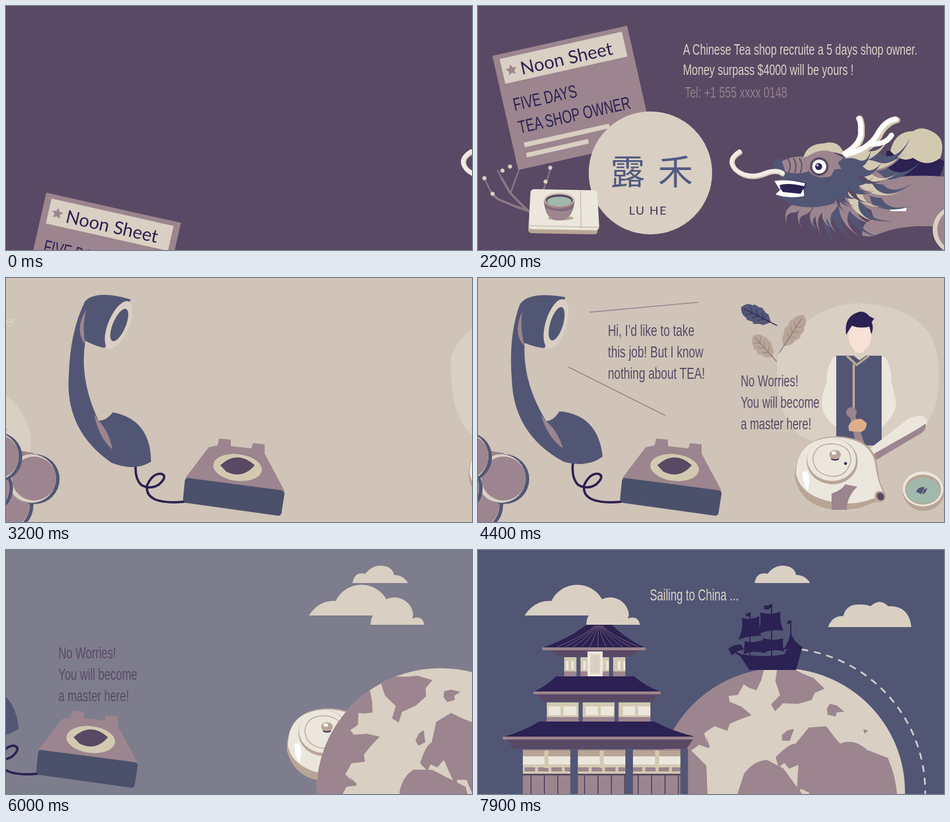
These frames come from a looping animation (800x421 px, 8000 ms). An HTML page:

```html
<!DOCTYPE html>
<html lang="en">
<head>
<meta charset="utf-8">
<title>Tea shop owner</title>
<style>
  html, body { margin: 0; width: 100%; height: 100%; overflow: hidden; background: #594964; }
  svg { display: block; width: 100%; height: 100%; }
  text { font-family: "Liberation Sans", sans-serif; white-space: pre; }
  .title { font-family: Lato, sans-serif; }
  .han { font-family: "Noto Sans CJK SC", "Noto Sans CJK", sans-serif; }
  .navy { fill: #525675; } .mauve { fill: #9c858e; } .cream { fill: #d9cfc2; }
  .ink { fill: #2b2152; } .plum { fill: #594964; } .pale { fill: #ebe7dd; }
  .tan { fill: #b9a596; } .sand { fill: #d3c9b1; } .tea { fill: #a1b9ac; } .white { fill: #fff; }
  .line { fill: none; stroke-linecap: round; stroke-linejoin: round; }
</style>
</head>
<body>
<svg id="stage" viewBox="0 0 800 421" preserveAspectRatio="none"></svg>
<script>
const stage = document.getElementById('stage');
const PURPLE = [89, 73, 100], BEIGE = [208, 196, 184], BLUE = [81, 86, 117];
const CONDENSED = 0.697;

// ---------- drawing helpers ----------
const path = (cls, d, extra = '') => `<path class="${cls}" d="${d}" ${extra}/>`;
const stroke = (color, width, d, extra = '') =>
  path('line', d, `stroke="${color}" stroke-width="${width}" ${extra}`);
const rect = (cls, x, y, w, h, r = 0) =>
  `<rect class="${cls}" x="${x}" y="${y}" width="${w}" height="${h}" rx="${r}"/>`;
const oval = (cls, x, y, rx, ry = rx, turn = 0) =>
  `<ellipse class="${cls}" cx="${x}" cy="${y}" rx="${rx}" ry="${ry}" transform="rotate(${turn} ${x} ${y})"/>`;
const group = (id, content) => `<g id="${id}">${content}</g>`;
const label = (x, y, size, color, text) =>
  `<text transform="translate(${x} ${y}) scale(${CONDENSED} 1)" font-size="${size}" fill="${color}">${text}</text>`;
const range = (n, draw) => Array.from({ length: n }, (_, i) => draw(i)).join('');

const star = (x, y, r) => path('mauve', 'M' + Array.from({ length: 10 }, (_, i) => {
  const a = i * Math.PI / 5 - Math.PI / 2, d = i % 2 ? r * 0.48 : r;
  return `${x + d * Math.cos(a)} ${y + d * Math.sin(a)}`;
}).join('L') + 'Z');

const flame = (cls, x, y, turn, l, w) => path(cls,
  `M0 ${-w}Q${l * .45} ${-w * 1.6} ${l * .6} 0T${l} ${-w * .4}Q${l * .7} ${w * 2.4} ${l * .4} ${w * .9}Q${l * .2} ${w * .2} 0 ${w}Z`,
  `transform="translate(${x} ${y}) rotate(${turn})"`);

const ball = (x, y) => oval('navy', x + 3, y + 1, 43) + oval('cream', x - 2, y, 42) + oval('mauve', x + 2, y, 38);

const leaf = (cls, vein, x, y, turn, l) => `<g transform="translate(${x} ${y}) rotate(${turn})">` +
  path(cls, `M${-l} 0Q${-l * .8} -13 ${-l * .5} -12L${-l * .4} -15L${-l * .1} -14L0 -16L${l * .3} -11L${l * .5} -10L${l * .8} 0L${l * .5} 10L${l * .3} 11L0 16L${-l * .1} 13L${-l * .4} 15L${-l * .5} 12Q${-l * .8} 12 ${-l} 0Z`) +
  stroke(vein, 1.5, `M${-l * .8} 0H${l * 1.15}`) +
  range(3, i => stroke(vein, .8, `M${(i - 1) * 11 - 7} -8l8 8l-8 8`)) + '</g>';

// ---------- first scene ----------
function newspaper() {
  return rect('mauve', -118.5, -101, 237, 202) + rect('cream', -107.5, -93, 215, 44) + star(-92, -70, 10) +
    '<text class="title ink" x="-76" y="-58" font-size="31">Noon Sheet</text>' +
    label(-102, 0, 31, '#2b2152', 'FIVE DAYS') + label(-102, 40, 31, '#2b2152', 'TEA SHOP OWNER') +
    rect('cream', -99, 57, 150, 8) + rect('cream', -99, 75, 109, 8);
}

function badge() {
  return oval('cream', 0, 0, 106) +
    '<text class="han" x="-69" y="20" font-size="60" letter-spacing="22" fill="#525a82">露禾</text>' +
    '<text class="title" x="-37" y="72" font-size="20" letter-spacing="2" fill="#43355a">LU HE</text>';
}

function teaSet() {
  return stroke('#8f7786', 4, 'M108 372Q78 348 55 322L40 296M88 354L62 345L34 333L24 324') +
    stroke('#8f7786', 2.5, 'M56 322L70 284M40 296L34 284M24 324L11 298M108 328L118 302L125 279') +
    [[55, 277], [42, 284], [11, 297], [25, 324], [124, 279], [116, 303]].map(p => oval('cream', ...p, 3.5)).join('') +
    path('tan', 'M88 374L206 374L205 391Q204 394 198 394L92 392Q86 391 86 385Z') +
    path('pale', 'M96 316L200 318Q205 319 205 325L208 380Q208 387 202 387L92 385Q86 384 87 378L90 322Q90 317 96 316Z') +
    stroke('#c9bba8', 1.5, 'M176 320L177 383M87 379L207 382') +
    oval('tan', 142, 366, 22, 4) +
    path('mauve', 'M113 333Q114 370 139 370Q164 370 166 333Z') +
    path('plum', 'M113 336Q115 348 139 350Q163 348 166 336L164 348Q150 360 116 349Z', 'opacity=".4"') +
    oval('sand', 139.5, 334, 26, 12) + oval('plum', 139.5, 335, 23.5, 10) + oval('tea', 139.5, 337, 21, 8);
}

function dragon() {
  const mane = (cls, n, from, step, length, w) =>
    range(n, i => flame(cls, 638 + 4 * (i % 2), 288, from + i * step, length - i * 3.5 + 8 * (i % 2), w));
  return path('ink', 'M730 250Q780 245 830 268L820 297L725 290Z') +
    path('sand', 'M736 250Q744 216 775 216Q790 205 812 219Q832 232 822 262Q800 280 775 262Q755 272 736 250Z') +
    path('mauve', 'M688 396Q686 372 708 368L690 310Q770 280 880 302V392Q780 366 712 395Q700 400 688 396Z') +
    path('white', 'M734 348L764 348L763 354L737 354Z') +
    mane('navy', 9, -22, 16, 145, 15) + mane('mauve', 8, -14, 17, 128, 11) +
    mane('sand', 6, -32, 17, 118, 9) + mane('plum', 7, -8, 17, 82, 7) + mane('navy', 8, -30, 19, 78, 11) +
    range(4, i => flame('mauve', 588 + i * 12, 326, 122 - i * 14, 60, 8)) +
    path('navy', 'M536 272Q542 259 556 266Q590 250 640 268L658 300L640 340Q610 352 570 344L540 327L548 322L538 302L552 294Q536 288 536 272Z') +
    path('ink', 'M538 304Q565 296 592 306L584 326L544 322L550 314Z') +
    path('white', 'M537 302Q560 298 590 306L588 311Q560 304 546 309L547 318Z M539 325L548 316L552 321L582 324L587 315L588 328Q560 333 539 325Z') +
    path('mauve', 'M550 268Q566 258 590 260L596 285Q578 292 556 286Z') +
    range(3, i => stroke('#594964', 2, `M${560 + i * 10} 263q7 10 2 24`)) +
    path('sand', 'M587 262Q592 238 622 237Q650 230 657 258Q630 244 587 262Z') +
    path('mauve', 'M590 262Q620 240 644 256L656 262L646 270L652 281L640 282L634 294Q606 300 596 284Z') +
    oval('plum', 614, 277, 16) + oval('white', 614, 277, 12) + oval('ink', 613, 277, 6) + oval('white', 611, 275, 1.8) +
    stroke('#d3c9b1', 10, 'M662 258Q700 252 717 225Q728 202 748 197M660 256Q690 238 687 216Q688 202 684 194') +
    stroke('#fff', 9, 'M660 256Q698 248 714 221Q726 198 745 195M658 254Q688 236 685 214Q686 202 682 194M700 238Q728 240 738 223') +
    stroke('#d3c9b1', 8, 'M478 253Q456 266 471 283Q492 302 522 290Q540 282 551 290') +
    stroke('#f3ece4', 7, 'M477 251Q454 266 470 282Q492 300 521 288Q540 281 551 288');
}

const balls = () => [[833, 392], [743, 386], [878, 346], [798, 362], [814, 308]].map(p => ball(...p)).join('');

// ---------- second scene ----------
function handset() {
  return group('cap', oval('cream', 240, 250, 50)) +
    path('navy', 'M72 45Q88 22 150 33L114 121Q96 119 80 112Q76 180 117 247Q130 246 140 230Q206 236 214 308Q188 328 147 317Q61 270 58 175Q52 100 72 45Z') +
    path('mauve', 'M76 58Q58 96 81 119Q71 90 76 58Z M117 247Q136 262 146 294Q120 276 108 236Z') +
    oval('cream', 134, 79, 18, 44, 17) + oval('navy', 135, 79, 11, 30, 17);
}

function phoneBase() {
  return stroke('#2b2152', 4, 'M163 318Q160 345 172 357Q188 366 203 356Q218 342 207 338Q192 336 182 358Q178 392 246 386') +
    path('mauve', 'M306 277L326 279L326 290L361 294L364 285L384 287L384 303L418 367L248 345L288 292L303 289Z') +
    path('navy', 'M252 345L412 366Q419 367 418 373L413 405Q412 411 406 410L249 388Q244 387 244 381L247 350Q248 345 252 345Z', 'style="fill:#4b506b"') +
    oval('sand', 337.5, 327, 42, 23, 7) + path('plum', 'M308 323Q337 296 367 323Q346 348 318 334Z');
}

function man() {
  return path('cream', 'M514 135Q525 105 565 75Q610 40 665 44Q740 50 775 95Q800 140 787 215Q770 275 700 285Q610 300 552 272Q510 240 514 135Z') +
    path('pale', 'M616 134Q600 140 598 180Q588 205 591 225Q600 258 640 264L652 244L626 220L630 136Z M692 134Q708 136 710 180L718 215Q716 240 690 260L664 264L662 244L686 225Z') +
    path('', 'M636 84H675V106Q670 122 662 124V140H647V124Q637 118 636 100Z', 'fill="#f9e1d5"') +
    path('ink', 'M632 98Q628 68 650 60Q662 54 672 66L680 70L676 76Q680 88 675 97L672 84Q654 88 642 82Z') +
    rect('navy', 615, 134, 78, 155) + path('cream', 'M645 134L646 129L663 129L666 134L655 142Z') +
    stroke('#b9a596', 4, 'M634 135L650 150L670 135M645 150V230') +
    path('mauve', 'M637 232H646L663 285H648Z') + oval('mauve', 641, 232, 9) +
    path('', 'M636 256Q640 243 658 243L667 250Q668 264 655 266L637 264Z', 'fill="#ddb08a"');
}

function teapot() {
  return path('pale', 'M660 304L740 242Q765 232 771 245Q773 260 755 268L680 305Z') +
    path('mauve', 'M668 310L752 262L769 251Q770 264 757 270L685 313Z') +
    path('tan', 'M544 345Q544 274 617 273Q684 276 686 330L690 352L700 374Q700 390 684 386L655 397Q560 412 544 345Z') +
    path('pale', 'M546 338Q546 276 615 275Q680 278 683 330L688 352L697 374Q688 385 680 380Q650 392 620 388Q555 380 546 338Z') +
    path('mauve', 'M607 372Q625 366 630 356L651 360Q633 378 633 400L607 400Z') +
    oval('tan', 690, 377, 9, 10, -30) + oval('plum', 691, 377, 6, 7, -30) +
    oval('tan', 608, 316, 44, 40, 5) + oval('pale', 607, 313, 42, 37, 5) +
    stroke('#b9a596', 1.5, 'M575 312Q578 286 608 286Q640 288 640 315Q634 344 606 342Q577 338 575 312Z') +
    oval('ink', 613, 312, 7, 3) + oval('tan', 613, 305, 10, 8) + oval('white', 611, 302, 4, 3) + oval('ink', 631, 320, 2.5) +
    path('white', 'M557 335Q558 358 566 366Q572 348 565 333Z') +
    oval('tan', 765, 368, 36, 34) + oval('pale', 764, 364, 35, 30) + oval('tan', 764, 365, 31, 26) + oval('tea', 764, 367, 29, 22) +
    path('navy', 'M752 369Q756 359 767 361L761 373ZM763 373Q764 364 771 362Q770 371 763 373Z');
}

const leaves = () => leaf('navy', '#2b2152', 480, 65, 27, 32) +
  leaf('tan', '#8f7786', 540, 94, 123, 36) + leaf('tan', '#8f7786', 491, 120, 48, 28);

// ---------- third scene ----------
function continents() {
  const placed = (turn, d) => path('mauve', d, `transform="rotate(${turn}) translate(-520 -417)"`);
  return placed(0, 'M398 240Q410 227 440 226L460 222L486 227L476 242L478 256L462 274L440 287L436 306L424 300L428 278L408 262Z') +
    placed(0, 'M508 244L520 240L536 242L526 250L528 257L515 262L508 254Z M580 250L588 247L586 255Z M596 282L612 274L618 283L604 286Z M472 322L480 314L485 335L474 342L468 334Z') +
    placed(0, 'M480 372Q486 340 496 334L500 298L524 280L546 288L560 292Q575 270 606 276L642 268Q690 300 712 350L726 390L740 430L690 560L570 540L578 421L562 392L546 394L548 412L536 390L520 362L510 376L498 372L494 384Z') +
    placed(0, 'M450 425Q452 398 470 384L502 381L530 392L562 404L575 440L540 540L470 500Z') +
    placed(-33, 'M300 330Q340 250 440 213L492 203L486 225L478 242L466 238L456 232L446 250L430 252L432 262L452 270L470 285L450 292L432 300L428 312L406 304L388 316L396 342L380 336L366 346L392 372L394 421L370 520L280 500Z') +
    placed(-33, 'M366 318L372 324L368 330Z M392 322L398 340L394 342Z');
}

function ship() {
  return path('ink', 'M430 171L452 180Q490 186 526 180L530 172L557 167L546 207H466L450 183Z') +
    path('ink', 'M453 117Q468 122 483 114Q482 136 486 148Q462 148 447 155Q456 136 453 117Z') +
    path('ink', 'M484 108Q506 113 519 106Q518 126 524 139Q496 136 478 147Q488 128 484 108Z') +
    path('ink', 'M458 157Q474 162 492 154Q490 168 494 178Q474 172 456 180Z M489 152Q508 158 524 152Q522 166 526 175Q506 170 488 178Z') +
    path('ink', 'M536 138Q540 158 558 168L523 172Q536 158 536 138Z M430 171Q438 162 452 163L456 172Q446 172 436 182Z') +
    stroke('#2b2152', 2, 'M467 108V190M504 94V190M537 122V180M430 171L470 190') +
    path('ink', 'M503 93Q498 98 491 95V102Q498 104 503 100Z M467 108L460 110V115L467 114Z M537 121L531 123V128L537 126Z');
}

function storey(x, y, w, h, bays) {
  const bay = w / bays, glass = h * .45;
  return rect('sand', x, y, w, h) +
    range(bays, i => rect('pale', x + i * bay + 10, y + h * .2, bay - 16, glass)) +
    range(bays, i => rect('sand', x + (i + .48) * bay, y, 5, h * .7)) +
    rect('mauve', x, y + h * .74, w, h * .26) +
    range(bays + 1, i => rect('navy', x + i * (w - 7) / bays, y, 7, h));
}

function roof(top, left, right, y, height, eaveLeft, eaveRight, drop) {
  return path('plum', `M${left + 4} ${y + height}H${right - 4}L${eaveRight} ${y + height + drop}H${eaveLeft}Z`) +
    path('ink', `M${top[0]} ${y}H${top[1]}Q${top[1] + (right - top[1]) * .4} ${y + height * .6} ${right} ${y + height}H${left}Q${top[0] - (top[0] - left) * .4} ${y + height * .6} ${top[0]} ${y}Z`) +
    rect('mauve', left, y + height - 1, right - left, 5, 2);
}

function pagoda() {
  return storey(141, 185, 119, 33, 4) +
    roof([186, 230], 110, 288, 129, 40, 140, 262, 15) +
    range(11, i => stroke('#8f7786', .8, `M${200 + i * 1.4} 131Q${186 + i * 4} 146 ${136 + i * 14} 167`)) +
    rect('pale', 188, 175, 26, 43) + rect('cream', 193, 180, 16, 33) +
    storey(111, 263, 192, 34, 3) + roof([134, 268], 95, 314, 218, 27, 110, 302, 16) +
    rect('mauve', 70, 344, 286, 80) + rect('pale', 74, 346, 280, 25) + rect('tan', 74, 346, 280, 10) +
    rect('sand', 74, 370, 280, 16) +
    range(12, i => rect('mauve', 80 + i * 23, 375, 18, 7)) +
    range(3, i => rect('sand', 114 + i * 95, 346, 7, 30)) +
    rect('plum', 74, 386, 280, 3) +
    range(12, i => rect('plum', 90 + i * 23, 388, 2, 40)) +
    range(4, i => rect('navy', 64 + i * 94.5, 343, 13, 90)) +
    roof([105, 303], 42, 376, 296, 27, 60, 358, 20);
}

stage.innerHTML =
  '<rect id="sky" width="800" height="421"/>' +
  group('advert', label(352, 84, 26, '#dcd2c6', 'A Chinese Tea shop recruite a 5 days shop owner.') +
    label(352, 119, 26, '#dcd2c6', 'Money surpass $4000 will be yours !') +
    label(355, 158, 26, '#94808d', 'Tel: +1 555 xxxx 0148')) +
  group('paper', newspaper()) + group('badge', badge()) + group('teaSet', teaSet()) +
  group('balls', '') + group('dragon', dragon()) + group('tail', balls()) +
  group('man', man()) + group('leaves', leaves()) +
  group('caller', stroke('#94808d', 1.6, 'M192 59L377 42M156 154L321 237') +
    ["Hi, I’d like to take", 'this job! But I know', 'nothing about TEA!'].map((s, i) => label(223, 100 + i * 37, 28, '#5a4966', s)).join('')) +
  group('base', phoneBase()) + group('handset', handset()) +
  group('reply', ['No Worries!', 'You will become', 'a master here!'].map((s, i) => label(451, 187 + i * 37, 27, '#5a4966', s)).join('')) +
  group('teapot', teapot()) +
  group('trail', stroke('#d3cbc6', 3, 'M35 -245.5A248 248 0 0 1 244 43', 'stroke-dasharray="12 10" style="stroke-linecap:butt"')) +
  group('earth', '<clipPath id="globe"><circle r="213"/></clipPath><circle class="cream" r="213"/><g clip-path="url(#globe)">' +
    group('land', continents()) + '</g>') +
  group('ship', `<g transform="translate(-520 -417)">${ship()}</g>`) +
  group('cloudA', path('cream', 'M80 113Q98 86 126 88A49 49 0 0 1 213 85A32 32 0 0 1 259 113L257 118Q275 112 278 129H186Q186 119 190 113Z')) +
  group('cloudB', path('cream', 'M475 57Q478 37 497 41Q512 22 535 29Q545 34 546 43Q562 43 570 57Z')) +
  group('cloudC', path('cream', 'M601 133Q608 113 627 114Q632 93 655 94Q668 94 674 97Q690 82 704 97Q740 95 744 133Z')) +
  group('pagoda', pagoda()) +
  group('sailing', label(307, 87, 27, '#dcd2c6', 'Sailing to China ...'));

// ---------- motion ----------
// Smooth monotone curve through time, value pairs.
function track(t, ...keys) {
  const last = keys.length / 2 - 1, time = i => keys[2 * i], value = i => keys[2 * i + 1];
  if (t <= time(0)) return value(0);
  if (t >= time(last)) return value(last);
  let i = 0;
  while (t >= time(i + 1)) i++;
  const slope = j => (value(j + 1) - value(j)) / (time(j + 1) - time(j));
  const tangent = j => {
    if (j < 1 || j >= last) return 0;
    const a = slope(j - 1), b = slope(j);
    return a * b > 0 ? 2 * a * b / (a + b) : 0;
  };
  const span = time(i + 1) - time(i), p = (t - time(i)) / span, q = 1 - p;
  return value(i) * q * q * (1 + 2 * p) + value(i + 1) * p * p * (3 - 2 * p) +
    span * p * q * (q * tangent(i) - p * tangent(i + 1));
}

const mix = (a, b, p) => a.map((v, i) => Math.round(v + (b[i] - v) * p));
const linear = (t, from, to) => Math.min(1, Math.max(0, (t - from) / (to - from)));

function pose(id, { x = 0, y = 0, turn = 0, cx = 0, cy = 0, scale = 1, opacity = 1 }) {
  const node = document.getElementById(id);
  node.setAttribute('transform', `translate(${x} ${y}) rotate(${turn} ${cx} ${cy}) scale(${scale})`);
  node.setAttribute('opacity', opacity);
  node.style.display = opacity > 0 && scale > 0 ? '' : 'none';
}

function render(t) {
  const first = t < 3600 ? 1 : 0, second = t >= 2600 && t < 6350 ? 1 : 0, third = t >= 5600 ? 1 : 0;
  const sky = mix(mix(PURPLE, BEIGE, linear(t, 2710, 3020)), BLUE, linear(t, 5800, 6110));
  document.getElementById('sky').setAttribute('fill', `rgb(${sky})`);

  const paperX = track(t, 2600, 0, 2700, -5, 2800, -22, 2900, -75, 3050, -220, 3250, -340);
  pose('paper', {
    x: 162.5 + paperX, y: track(t, -100, 500, 0, 446.6, 200, 270, 500, 158.5),
    turn: track(t, -100, 16, 0, 12.7, 200, -4, 500, -12.7), opacity: first
  });
  pose('badge', {
    x: 296 + track(t, 2700, 0, 2800, -10, 2900, -45, 3100, -240, 3300, -430), y: 288,
    scale: track(t, 200, 0, 700, 1), opacity: first
  });
  pose('teaSet', { x: paperX * 2, y: track(t, 300, 160, 800, 0), opacity: first });
  pose('advert', { x: track(t, 2800, 0, 2900, -60, 3100, -520, 3250, -780), y: track(t, 400, -165, 900, 0), opacity: first });

  const dragonX = track(t, -200, 420, 0, 321, 300, 120, 600, 25, 1000, 4, 1300, 0, 1900, -9, 2300, -40,
    2500, -130, 2600, -250, 2700, -440, 2800, -633, 2900, -750, 3050, -815, 3300, -836, 5500, -836, 5900, -990);
  const dragonOn = t < 6000 ? 1 : 0;
  pose('dragon', { x: dragonX, opacity: dragonOn });
  pose('tail', { x: dragonX + track(t, 2000, 130, 2800, 0), opacity: dragonOn });

  const phoneX = track(t, 5600, 0, 5800, -30, 6000, -192, 6200, -410, 6300, -450);
  const handsetTurn = track(t, 2600, 130, 2800, 100, 3000, 35, 3200, 6, 3400, 0);
  pose('handset', {
    x: phoneX + track(t, 2600, 1050, 2800, 770, 3000, 260, 3200, 50, 3400, 0),
    y: track(t, 2800, -70, 3200, 0), turn: handsetTurn, cx: 120, cy: 170, opacity: second
  });
  pose('cap', { opacity: handsetTurn > 20 ? 1 : 0 });
  pose('base', { x: phoneX + track(t, 2700, 800, 2800, 700, 3000, 300, 3200, 60, 3450, 0), opacity: second });

  const hostX = track(t, 2800, 800, 3000, 560, 3200, 250, 3400, 50, 3600, 0);
  pose('man', { x: hostX, opacity: second * (1 - linear(t, 5550, 5850)) });
  pose('teapot', { x: hostX + track(t, 5700, 0, 5850, -15, 6000, -62, 6300, -100), opacity: second });
  pose('leaves', { opacity: linear(t, 3300, 3700) * (1 - linear(t, 5500, 5800)) });
  pose('caller', { x: track(t, 5500, 0, 5700, -80, 5900, -420, 6000, -600), opacity: second * linear(t, 3400, 3800) });
  pose('reply', {
    x: track(t, 3900, -35, 4400, 0, 5600, 0, 5800, -80, 6000, -361, 6200, -640),
    opacity: second * linear(t, 3900, 4400)
  });

  const earthX = track(t, 5700, 1050, 5850, 950, 6000, 746, 6100, 610, 6300, 520);
  const sail = track(t, 6250, 110, 6400, 80, 6600, 32, 6800, 11, 7000, 5.5, 7900, 0, 8300, -2.4);
  const sailing = t >= 6250 ? 1 : 0;
  pose('earth', { x: earthX, y: 417, opacity: third });
  pose('land', { turn: track(t, 5700, 20, 6000, 6, 6500, -8, 7000, 0, 7900, 33, 8300, 48) });
  pose('trail', { x: 520, y: 417, turn: sail, opacity: sailing });
  pose('ship', { x: 520, y: 417, turn: sail, opacity: sailing });
  pose('cloudA', { x: track(t, 5700, 850, 5850, 720, 6000, 440, 6100, 190, 6280, 0), opacity: third });
  pose('cloudB', { x: track(t, 5700, 400, 5850, 320, 6000, 120, 6200, 0), opacity: third });
  pose('cloudC', { x: track(t, 5800, 330, 6000, 210, 6280, 0), opacity: third });
  pose('pagoda', { y: track(t, 6150, 310, 6400, 150, 6700, 0), opacity: third });
  pose('sailing', { x: track(t, 6250, 520, 6400, 380, 6600, 110, 6800, 14, 7000, 0, 7900, -12, 8300, -17), opacity: third });
}

// Ten pictures a second, like the printed rhythm of the piece.
function tick(now) {
  render(Math.floor(now / 100) * 100 % 8000);
  requestAnimationFrame(tick);
}
render(0);
requestAnimationFrame(tick);
</script>
</body>
</html>
```
